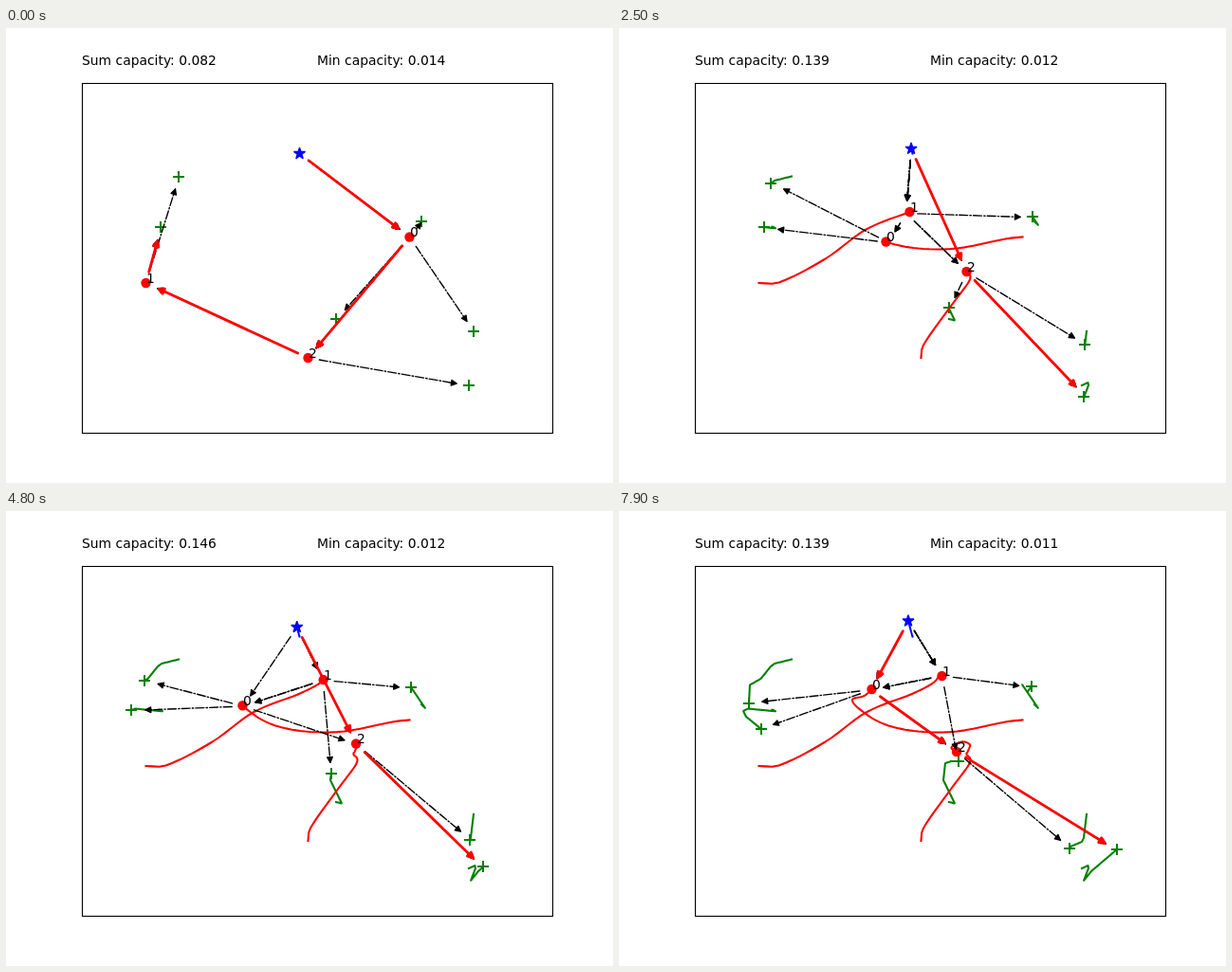
An HTML page for the animation above (8000 ms loop, 640x480 px).

```html
<!DOCTYPE html>
<html lang="en">
<head>
<meta charset="utf-8">
<title>Relay network capacity</title>
<style>
  html, body { margin: 0; width: 100%; height: 100%; overflow: hidden; background: #fff; }
  svg { display: block; width: 640px; height: 480px; }
  text { font: 13.89px "DejaVu Sans", sans-serif; fill: #000; white-space: pre; }
  .trail { fill: none; stroke-width: 2.08; stroke-linejoin: round; stroke-linecap: square; }
  .plus { stroke: #008000; stroke-width: 2; fill: none; }
  .link { stroke-linecap: round; stroke-linejoin: round; }
</style>
</head>
<body>
<svg viewBox="0 0 640 480">
  <rect x="80.5" y="58.5" width="496" height="369" fill="none" stroke="#000" stroke-width="1.1"/>
  <text id="sum" x="80" y="39"></text>
  <text id="min" x="328" y="39"></text>
  <g id="users"></g>
  <g id="network" transform="translate(.5 .5)"></g>
  <g id="labels"></g>
</svg>
<script>
const STEP = 100, STEPS = 80, GAP = 12;
const RED = '#f00', GREEN = '#008000', BLUE = '#00f', BLACK = '#000';
const USERS = [...'ABCDEF'], RELAYS = [...'012'];

const lerp = (a, b, k) => a + (b - a) * k;

// Positions for every step
const track = at => Array.from({ length: STEPS }, (_, t) => at(t));

// Constant speed along a polyline, done at the last step
function walk(...pts) {
  const dist = [0];
  for (let i = 1; i < pts.length; i++) {
    dist.push(dist[i - 1] + Math.hypot(pts[i][0] - pts[i - 1][0], pts[i][1] - pts[i - 1][1]));
  }
  return track(t => {
    const d = dist.at(-1) * t / (STEPS - 1);
    const i = Math.max(1, dist.findIndex(v => v >= d - 1e-9));
    const k = (d - dist[i - 1]) / (dist[i] - dist[i - 1]);
    return [0, 1].map(c => lerp(pts[i - 1][c], pts[i][c], k));
  });
}

// Smooth curve through [step, a, b] keys
function glide(...keys) {
  const slope = (i, c) => {
    const p = keys[Math.max(0, i - 1)], q = keys[Math.min(keys.length - 1, i + 1)];
    return (q[c] - p[c]) / (q[0] - p[0]);
  };
  return track(t => {
    const j = Math.max(1, keys.findIndex(key => key[0] >= t)), p = keys[j - 1], q = keys[j];
    const span = q[0] - p[0], s = (t - p[0]) / span;
    return [1, 2].map(c =>
      lerp(p[c], q[c], s * s * (3 - 2 * s)) +
      span * s * (1 - s) * (slope(j - 1, c) * (1 - s) - slope(j, c) * s));
  });
}

const tracks = {
  S: walk([309, 132], [304.5, 115.5]),
  A: walk([182, 156.5], [164, 161], [160, 164], [149.5, 177], [138, 183.5], [137, 203]),
  B: walk([163, 210], [165, 211.3], [161, 209.5], [165, 211.3], [136, 208.5], [131, 211], [134, 217], [150, 230]),
  C: walk([438, 204], [442, 208], [425, 183], [430.5, 191], [435, 185]),
  D: walk([348, 307], [354, 308.5], [342, 284], [344, 266], [350, 264], [358, 264]),
  E: walk([493, 320], [490, 345], [488, 349], [476, 354], [475, 356]),
  F: walk([488, 377], [494.5, 374], [495, 377], [490, 390], [498, 380], [525, 357]),
  0: glide([0, 425, 220], [4, 407, 222], [10, 356, 232], [16, 315, 232], [25, 281, 225],
           [39, 257, 211.5], [58, 245.5, 198.5], [69, 258, 194.5], [79, 266, 187.5]),
  1: glide([0, 147, 268.5], [3, 168, 268], [10, 217, 243], [17, 260, 212], [25, 306, 193.5],
           [39, 329, 182], [58, 337, 174], [69, 341, 172.5], [79, 340, 173.5]),
  2: glide([0, 318, 347.5], [3, 320.5, 334], [10, 349, 293.5], [16, 369, 266], [25, 366, 256.5],
           [39, 367.5, 252.5], [46, 369.5, 246], [58, 360.5, 243], [69, 350, 249], [79, 355.5, 253.5]),
};

const capacity = glide([0, .082, .014], [10, .098, .016], [25, .139, .012],
                       [39, .146, .012], [58, .144, .011], [79, .1386, .011]);

// From a step on: the path from the star to each user; '*' marks the weakest
const plans = [
  [0,  'S021A S021B* S0C S0D S0E S02F'],
  [4,  'S01A S01B S0C S0D S02E S02F*'],
  [16, 'S1A S1B S0C S02D S02E S02F*'],
  [20, 'S10A S10B S1C S12D S12E S2F*'],
  [31, 'S10A S10B S1C S12D S02E S2F*'],
  [48, 'S10A S10B S1C S1D S02E S2F*'],
  [72, 'S10A S10B S1C S1D S02E S02F*'],
];

const point = ([x, y]) => x.toFixed(2) + ',' + y.toFixed(2);

function trail(name, t, color) {
  const pts = tracks[name].slice(0, t + 1);
  return t ? `<polyline class="trail" stroke="${color}" points="${pts.map(point).join(' ')}"/>` : '';
}

function plus(pos) {
  const [x, y] = pos.map(Math.round);
  return `<path class="plus" d="M${x - 6} ${y}h12M${x} ${y - 6}v12"/>`;
}

function star([x, y]) {
  const pts = Array.from({ length: 10 }, (_, i) => {
    const r = i % 2 ? 2.4 : 6.3, a = i * Math.PI / 5;
    return point([x + r * Math.sin(a), y - r * Math.cos(a)]);
  });
  return `<polygon points="${pts.join(' ')}" fill="${BLUE}" stroke="${BLUE}" stroke-width="1.39" stroke-linejoin="bevel"/>`;
}

const dot = ([x, y]) => `<circle cx="${x}" cy="${y}" r="5.2" fill="${RED}"/>`;

function label(text, pos) {
  const [x, y] = pos.map(Math.round);
  return `<text x="${x + 1}" y="${y}">${text}</text>`;
}

function arrow([x0, y0], [x1, y1], color, width, dash) {
  const len = Math.hypot(x1 - x0, y1 - y0), ux = (x1 - x0) / len, uy = (y1 - y0) / len;
  const at = (d, side = 0) => point([x0 + ux * d - uy * side, y0 + uy * d + ux * side]);
  // very short links keep their full far end
  const tip = (len < 2 * GAP ? len : len - GAP) - width * 1.12;
  const head = `${at(tip - 5.6, 2.8)} ${at(tip)} ${at(tip - 5.6, -2.8)}`;
  const shaft = tip > GAP ? `<path d="M${at(GAP)}L${at(tip)}" stroke-dasharray="${dash}"/>` : '';
  return `<g class="link" stroke="${color}" fill="${color}" stroke-width="${width}">${shaft}<polygon points="${head}"/></g>`;
}

function links(t) {
  const plan = plans.filter(p => p[0] <= t).pop()[1].split(' ');
  const before = Math.max(0, t - 1); // links lag the nodes by one step
  let thin = '', bold = '';
  for (const path of plan) {
    const stops = [...path.replace('*', '')].map(n => tracks[n][before]);
    for (let i = 1; i < stops.length; i++) {
      thin += arrow(stops[i - 1], stops[i], BLACK, 1.39, '8.9 2.2 1.4 2.2');
      if (path.endsWith('*')) bold += arrow(stops[i - 1], stops[i], RED, 2.78, 'none');
    }
  }
  return thin + bold;
}

const byId = id => document.getElementById(id);
const each = (names, part) => names.map(part).join('');

function draw(t) {
  const [sum, min] = capacity[t];
  byId('sum').textContent = 'Sum capacity: ' + sum.toFixed(3);
  byId('min').textContent = 'Min capacity: ' + min.toFixed(3);
  byId('users').innerHTML = each(USERS, n => trail(n, t, GREEN) + plus(tracks[n][t]));
  byId('network').innerHTML = trail('S', t, BLUE) +
    each(RELAYS, n => trail(n, t, RED) + dot(tracks[n][t])) +
    star(tracks.S[t]) + links(t);
  byId('labels').innerHTML = each(RELAYS, n => label(n, tracks[n][t]));
}

const start = performance.now();
let shown = -1;
function tick() {
  const t = Math.floor((performance.now() - start) / STEP) % STEPS;
  if (t !== shown) draw(shown = t);
  requestAnimationFrame(tick);
}
tick();
</script>
</body>
</html>
```
